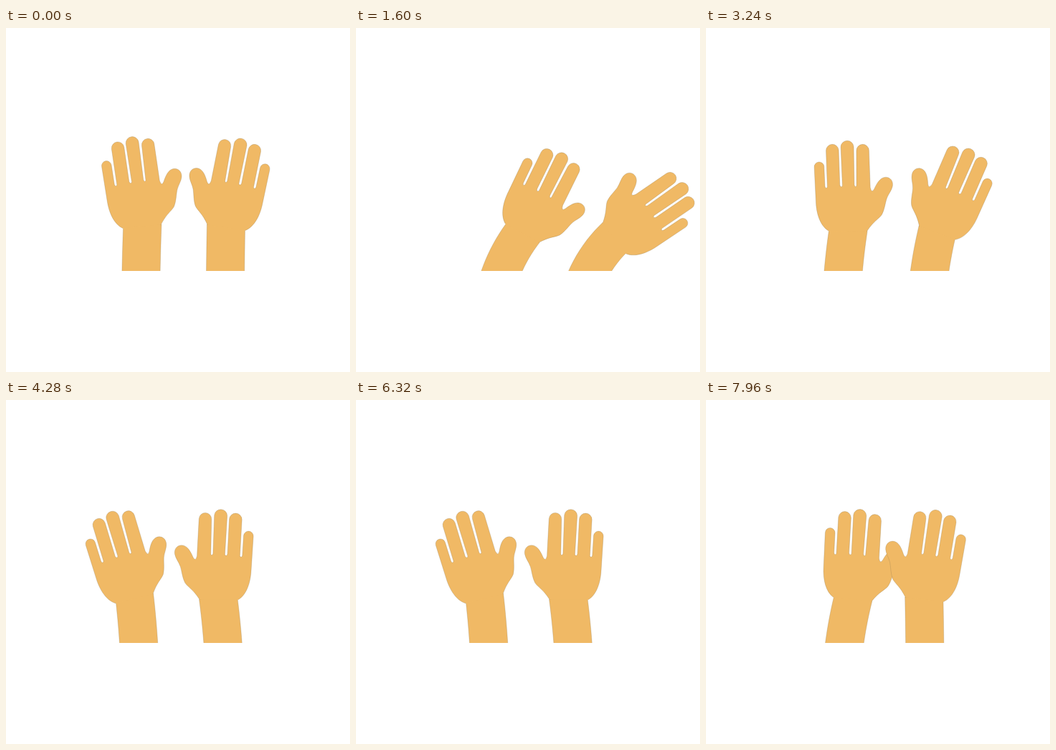
Write an HTML page that moves like this. It is 480 px wide and 480 px high and loops after 8000 ms.

```html
<!DOCTYPE html>
<html lang="en">
<head>
<meta charset="utf-8">
<title>Waving hands</title>
<style>
  html, body { margin: 0; width: 100%; height: 100%; overflow: hidden; background: #fff; }
  svg { display: block; width: 100vw; height: 100vh; }
  path { fill: #f0b965; stroke: #8d7850; stroke-width: .5; stroke-opacity: .55; stroke-linejoin: round; }
</style>
</head>
<body>
<svg viewBox="0 0 480 480">
  <defs>
    <clipPath id="floor"><rect width="480" height="339"/></clipPath>
    <path id="hand" d="M163 279.500 C151 274 143.500 258 141 240
      L133.600 193.500 A6.800 6.800 0 0 1 147 191 L151.300 218.500 Q153 222.500 154.800 219
      L147.300 168.500 A8.800 8.800 0 0 1 164.700 166 L171.800 214.500 Q173.800 218.500 175.500 215
      L167.200 161.200 A9 9 0 0 1 185 158.800 L191.800 212 Q193.800 216 195 212.500
      L189.500 164.200 A8.700 8.700 0 0 1 206.800 161.800 L214.300 213 Q217.200 221.500 220 214.500
      C222 208.500 224 204 226.500 201 C233 192.500 245.500 196 245 207.500
      C244.500 214 240.500 219 238.800 226 C237.500 232 237.500 242 234.500 249
      C231 255.500 224 259 216.200 274.500"/>
  </defs>
  <g clip-path="url(#floor)">
    <g id="left"><path/><use href="#hand"/></g>
    <g transform="translate(493.4 1.5) scale(-1 1)"><g id="right"><path/><use href="#hand"/></g></g>
  </g>
</svg>
<script>
const LOOP = 8000, CYCLE = 2040;
const ARM = { x: 187.7, wrist: 278, length: 143, half: 26.6 };
const DRAWN_BEND = 2, DRAWN_WRIST = [190.2, 278];

// [time in ms, bend in degrees], eased between keys
const LEFT_KEYS = [[0, 2], [35, 2], [725, -55.5], [1500, 40], [2040, 2]];
const RIGHT_KEYS = [[0, 1], [10, 1], [800, -55.5], [1490, 55], [1940, -9], [2040, 1]];

const ease = u => u * u * (3 - 2 * u);

function valueAt(keys, t) {
  const i = keys.findIndex(k => k[0] > t);
  const [t0, a] = keys[i - 1], [t1, b] = keys[i];
  return a + (b - a) * ease((t - t0) / (t1 - t0));
}

// Point on the arm's centre line, s px above its root; straight past the wrist.
function armPoint(s, bend) {
  const { x, wrist, length } = ARM;
  const k = (Math.abs(bend) < 1e-4 ? 1e-4 : bend) / length;
  const c = Math.min(s, length), a = c * k, extra = s - c;
  return {
    a,
    x: x + (1 - Math.cos(a)) / k + extra * Math.sin(a),
    y: wrist + length - Math.sin(a) / k - extra * Math.cos(a)
  };
}

function armPath(bend) {
  const sides = [[], []];
  for (let s = 30; s <= ARM.length + 5; s += (ARM.length + 5 - 30) / 16) {
    const p = armPoint(s, bend);
    [-1, 1].forEach((dir, i) => {
      const w = dir * ARM.half;
      sides[i].push((p.x + w * Math.cos(p.a)).toFixed(2) + " " + (p.y + w * Math.sin(p.a)).toFixed(2));
    });
  }
  return "M" + sides[0].concat(sides[1].reverse()).join("L");
}

function pose(group, degrees, dip) {
  const bend = degrees * Math.PI / 180;
  const [arm, hand] = group.children;
  const w = armPoint(ARM.length, bend);
  arm.setAttribute("d", armPath(bend));
  hand.setAttribute("transform",
    `translate(${w.x} ${w.y}) rotate(${degrees - DRAWN_BEND}) translate(${-DRAWN_WRIST[0]} ${-DRAWN_WRIST[1]})`);
  group.setAttribute("transform", `translate(0 ${dip})`);
}

const left = document.getElementById("left");
const right = document.getElementById("right");

function draw(ms) {
  const t = ms % LOOP % CYCLE;
  const u = (t - 1000) / 400;
  // hands sink a little while sweeping across
  const dip = u > 0 && u < 1 ? 6 * Math.sin(Math.PI * u) ** 2 : 0;
  pose(left, valueAt(LEFT_KEYS, t), dip);
  pose(right, -valueAt(RIGHT_KEYS, t), dip);
}

const start = performance.now();
function tick() {
  draw(performance.now() - start);
  requestAnimationFrame(tick);
}
tick();
</script>
</body>
</html>
```
